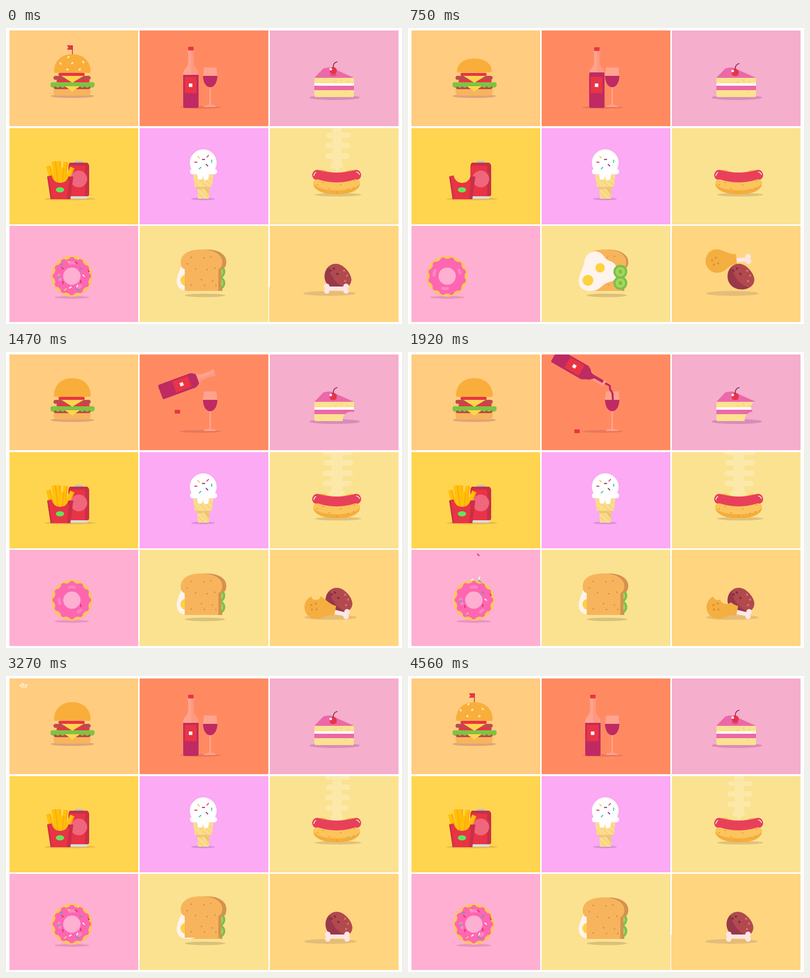
Animation, 800 px wide and 600 px high, one loop 4.59 s. Source, as an HTML page without scripts:

```html
<!DOCTYPE html>
<html lang="en">
<head>
<meta charset="utf-8">
<title>Nine snacks</title>
<style>
html, body { margin: 0; height: 100%; overflow: hidden; background: #fff; }
svg { display: block; width: 800px; height: 600px; }
/* The finished picture shows for 30 ms, then every snack is built again. */
g, use, path, rect, circle, ellipse { animation: none 4.59s linear 30ms infinite; }
.foot { transform-box: fill-box; transform-origin: 50% 100%; }
.step { animation-timing-function: step-end; }
.drop { animation-timing-function: ease-in; }
.round { stroke-linecap: round; fill: none; }

/* dN: falls into place starting at N percent */
@keyframes d0 { 0% { translate: 0 -180px } 4% { translate: 0 } }
@keyframes d2 { 0%, 2% { translate: 0 -180px } 5% { translate: 0 } }
@keyframes d4 { 0%, 4% { translate: 0 -180px } 7% { translate: 0 } }
@keyframes d6 { 0%, 6% { translate: 0 -180px } 9% { translate: 0 } }
@keyframes d8 { 0%, 8% { translate: 0 -180px } 11% { translate: 0 } }
@keyframes d11 { 0%, 11% { translate: 0 -180px } 15% { translate: 0 } }
@keyframes d13 { 0%, 13% { translate: 0 -180px } 18% { translate: 0 } }
@keyframes d16 { 0%, 16% { translate: 0 -180px } 19% { translate: 0 } }
@keyframes d18 { 0%, 18% { translate: 0 -180px } 21% { translate: 0 } }
@keyframes d20 { 0%, 20% { translate: 0 -180px } 24% { translate: 0 } }
@keyframes d22 { 0%, 22% { translate: 0 -180px } 27% { translate: 0 } }
@keyframes d27 { 0%, 27% { translate: 0 -180px } 31% { translate: 0 } }
@keyframes d31 { 0%, 31% { translate: 0 -180px } 35% { translate: 0 } }
@keyframes d35 { 0%, 35% { translate: 0 -180px } 40% { translate: 0 } }
@keyframes d38 { 0%, 38% { translate: 0 -180px } 43% { translate: 0 } }
@keyframes d42 { 0%, 42% { translate: 0 -180px } 47% { translate: 0 } }
@keyframes d73 { 0%, 73% { translate: 0 -80px } 78% { translate: 0 } }

/* bN: a bite is missing from N percent on */
@keyframes b30 { 0% { opacity: 0 } 30% { opacity: 1 } 58%, 100% { opacity: 0 } }
@keyframes b36 { 0% { opacity: 0 } 36% { opacity: 1 } 58%, 100% { opacity: 0 } }
@keyframes b44 { 0% { opacity: 0 } 44% { opacity: 1 } 58%, 100% { opacity: 0 } }
@keyframes b48 { 0% { opacity: 0 } 48% { opacity: 1 } 58%, 100% { opacity: 0 } }
@keyframes b51 { 0% { opacity: 0 } 51% { opacity: 1 } 58%, 100% { opacity: 0 } }

@keyframes hop { 0%, 51% { transform: none } 55.6% { transform: translateY(var(--j)) } 60% { transform: none } }
@keyframes bun {
  0%, 15% { transform: none } 15.7% { transform: translateY(-1px) scale(.95, .74) } 18%, 51% { transform: none }
  55.6% { transform: translateY(-19px) scale(.9, .87) } 60% { transform: none }
}
@keyframes bottle {
  0%, 25% { transform: translate(8px, 0) rotate(0) }
  36%, 48% { transform: translate(-37px, -87px) rotate(120deg) }
  55.6% { transform: translate(2px, -21px) rotate(18deg) }
  61%, 100% { transform: translate(0, 0) rotate(0) }
}
@keyframes cap {
  0%, 17% { translate: 8px 1px } 22% { translate: 0 -60px } 27% { translate: -14px -30px }
  33%, 48% { translate: -32px 119px } 53% { translate: -26px -42px } 55.6% { translate: -18px -23px } 61% { translate: 0 }
}
@keyframes fullLevel { 0% { opacity: 1 } 58%, 100% { opacity: 0 } }
@keyframes tilted { 0% { opacity: 0 } 30% { opacity: 1 } 58%, 100% { opacity: 0 } }
@keyframes pouring { 0% { opacity: 0 } 35% { opacity: 1 } 48%, 100% { opacity: 0 } }
@keyframes cake { 0% { translate: 0 -180px } 4%, 57.9% { translate: 0 } 58% { translate: 0 -180px } 63% { translate: 0 } }
@keyframes cherry {
  0%, 4% { translate: 0 -180px } 8%, 49% { translate: 0 3.5px } 53%, 59% { translate: 0 48px }
  62% { translate: 0 -22px } 66%, 94% { translate: 0 3.5px }
}
@keyframes cakeShade { 0% { opacity: 1 } 51% { opacity: 0 } 61%, 100% { opacity: 1 } }
@keyframes crumbs { 0% { opacity: 0 } 44% { opacity: 1 } 61%, 100% { opacity: 0 } }
@keyframes steam {
  0%, 17% { clip-path: inset(100% -30% 0); transform: translateY(7px) scaleX(1.25) }
  24.2% { clip-path: inset(36% -30% 0); transform: translateY(7px) scaleX(1.22) }
  32% { clip-path: inset(0 -30% 0) } 41.2% { transform: translateY(7px) scaleX(1.25) }
  55.6% { transform: translateY(11px) scaleX(1) } 70.6% { transform: translateY(8px) scaleX(1) }
  100% { clip-path: inset(0 -30% 0); transform: translateY(0) scaleX(1) }
}
@keyframes arrive { 0%, 6% { translate: -140px 0 } 15.7% { translate: -54px 0 } 21% { translate: 3px 0 } 24% { translate: 0 } }
@keyframes roll { 0%, 6% { rotate: -193deg } 15.7% { rotate: -75deg } 21% { rotate: 4deg } 24% { rotate: 0deg } }
@keyframes slice {
  0%, 22% { transform: none } 24.2% { transform: scaleY(1.06) } 27%, 68% { transform: none }
  70.6% { transform: translateY(-2.5px) } 73% { transform: none }
}
@keyframes leg {
  0%, 11% { transform: translate(-6px, -150px) rotate(-30deg) } 15.7% { transform: translate(-2px, -45px) rotate(-17deg) }
  19%, 100% { transform: translate(0, 0) rotate(0) }
}
@keyframes legShown { 0% { opacity: 1 } 50%, 100% { opacity: 0 } }
@keyframes boneShown { 0% { opacity: 0 } 50%, 100% { opacity: 1 } }
@keyframes nudge { 0% { translate: 2px 0 } 76%, 100% { translate: 0 } }
@keyframes strip { 0% { opacity: 0 } 76%, 100% { opacity: 1 } }
</style>
</head>
<body>
<svg viewBox="0 0 800 600">
<defs>
  <clipPath id="row1"><path d="M0 5h800v194H0z"/></clipPath>
  <clipPath id="row2"><path d="M0 203h800v195H0z"/></clipPath>
  <clipPath id="row3"><path d="M0 401h800v195H0z"/></clipPath>
  <ellipse id="seed" rx="2.6" ry="1.5"/>
  <path id="spr" class="round" stroke-width="2" d="M-2.3 0h4.6"/>
  <g id="fry"><path fill="#ffc107" d="M0 0h9v46H0z"/><path fill="#ffa814" d="M6.5 0h2.5v46h-2.5z"/></g>
  <path id="bread" d="M361 533V489c-6-2-8-7-8-13 0-17 14-27 42-27s42 12 42 25c0 8-3 13-8 15v44z"/>
  <g id="cucumber"><circle r="14" fill="#7cc04a"/><circle r="9.5" fill="#a5d65c"/><circle r="4" fill="#7cc04a"/></g>
  <mask id="cakeBites" maskUnits="userSpaceOnUse" x="0" y="0" width="800" height="600">
    <path fill="#fff" d="M0 0h800v600H0z"/>
    <g class="bites">
      <circle class="step" opacity="0" cx="697" cy="138" r="17" style="animation-name:b30"/>
      <circle class="step" opacity="0" cx="706" cy="112" r="13" style="animation-name:b36"/>
      <circle class="step" opacity="0" cx="692" cy="100" r="25" style="animation-name:b44"/>
      <circle class="step" opacity="0" cx="662" cy="130" r="30" style="animation-name:b48"/>
      <circle class="step" opacity="0" cx="656" cy="108" r="60" style="animation-name:b51"/>
    </g>
  </mask>
  <mask id="legBites" maskUnits="userSpaceOnUse" x="0" y="0" width="800" height="600">
    <path fill="#fff" d="M0 0h800v600H0z"/>
    <circle class="step" opacity="0" cx="624" cy="493" r="10" style="animation-name:b30"/>
    <circle class="step" opacity="0" cx="641" cy="498" r="13" style="animation-name:b36"/>
    <circle class="step" opacity="0" cx="615" cy="520" r="20" style="animation-name:b44"/>
    <circle class="step" opacity="0" cx="640" cy="525" r="26" style="animation-name:b48"/>
  </mask>
</defs>

<g clip-path="url(#row1)">
  <path fill="#ffcc80" d="M7 5h260v194H7z"/>
  <path fill="#ff8a62" d="M270 5h260v194H270z"/>
  <path fill="#f5aecb" d="M533 5h260v194H533z"/>

  <g id="burger">
    <ellipse cx="134" cy="138" rx="44" ry="3.8" fill="#dba57a"/>
    <path class="drop" style="animation-name:d0" fill="#f8b45c" d="M96 124h75v4q0 9-9 9h-57q-9 0-9-9z"/>
    <rect class="drop" style="animation-name:d2" x="96" y="115" width="75" height="9" rx="4.5" fill="#b94a48"/>
    <g class="drop" style="animation-name:d4,hop;--j:-3px">
      <path class="round" stroke="#7fc342" stroke-width="10" stroke-dasharray="0 9.85" d="M95 116h79.5"/>
      <rect x="90" y="110" width="89" height="8" rx="4" fill="#7fc342"/>
    </g>
    <path class="drop" style="animation-name:d4" fill="#ffd54f" d="M119 118h30l-15 11z"/>
    <rect class="drop" style="animation-name:d6,hop;--j:-4px" x="102" y="105" width="67" height="5" rx="2.5" fill="#e83445"/>
    <rect class="drop" style="animation-name:d6,hop;--j:-5px" x="96" y="97" width="75" height="8" rx="4" fill="#bd4c4b"/>
    <path class="drop" style="animation-name:d8,hop;--j:-5px" fill="#ffd54f" d="M112 97h45l-23 14z"/>
    <rect class="drop" style="animation-name:d8,hop;--j:-12px" x="106" y="91" width="53" height="6" rx="3" fill="#e83445"/>
    <path class="foot drop" style="animation-name:d11,bun" fill="#f9ae3b" d="M97 88c0-21 15-35 37-35s37 14 37 35q0 3-3 3h-68q-3 0-3-3z"/>
    <g fill="#fff3d9">
      <use href="#seed" transform="translate(124 84)" style="animation-name:d20,hop;--j:-45px"/>
      <use href="#seed" transform="translate(149 84) rotate(-30)" style="animation-name:d22,hop;--j:-44px"/>
      <use href="#seed" transform="translate(110 72) rotate(60)" style="animation-name:d27,hop;--j:-33px"/>
      <use href="#seed" transform="translate(134 71) rotate(-40)" style="animation-name:d31,hop;--j:-37px"/>
      <use href="#seed" transform="translate(156 69) rotate(50)" style="animation-name:d27,hop;--j:-39px"/>
      <use href="#seed" transform="translate(126 59) rotate(-50)" style="animation-name:d31,hop;--j:-39px"/>
    </g>
    <g class="drop" style="animation-name:d73"><path fill="#a8324a" d="M133.5 35h1.5v18h-1.5z"/><path fill="#e83445" d="M123 35h11v9h-11l3-4.500z"/></g>
  </g>

  <g id="wine">
    <ellipse cx="393" cy="161" rx="42" ry="2.8" fill="#e9785a"/>
    <path fill="#ffa38f" d="M400 80h25l2 17c0 13-6 22-13 22.500V156q10 .5 11 4h-26q1-3.500 12-4v-36.500c-8-1-13-10-13-22.500z"/>
    <path fill="#bf2a63" d="M398 97h29c0 13-6 23-14.500 23s-14.500-10-14.500-23z"/>
    <path class="step" opacity="0" style="animation-name:pouring" fill="none" stroke="#bf2a63" stroke-width="4" d="M398 63c6 4 11 4 10 9s4 7 5 12 0 7 1 13"/>
    <g style="animation-name:bottle;transform-origin:373px 116px">
      <path fill="#ffa38f" d="M367 45h13v7h-1v19c1 10 10 12 10 22v66q0 3-3 3h-25q-3 0-3-3V93c0-10 9-12 10-22V52h-1z"/>
      <path fill="#ff9880" d="M374 45h6v7h-1v19c1 10 10 12 10 22v3h-15z"/>
      <g fill="#bf2a63">
        <path d="M358 95h31v64q0 3-3 3h-25q-3 0-3-3z"/>
        <path class="step" opacity="0" style="animation-name:fullLevel" d="M358.500 90h30l.5 6h-31z"/>
        <path class="step" opacity="0" style="animation-name:tilted" d="M364 82h19c3 3 6 6 6 14h-31c0-8 3-11 6-14z"/>
        <path class="step" opacity="0" style="animation-name:pouring" d="M368 50h6v19c6 4 10 11 10 14h-20c3-4 4-6 4-12z"/>
      </g>
      <path fill="#e83445" d="M361 99h24v33h-24z"/>
      <path fill="#fff" d="M369.500 112.500h7v7h-7z"/>
    </g>
    <rect x="368" y="38" width="11" height="7.500" rx="1" fill="#e83445" style="animation-name:cap"/>
  </g>

  <g id="dessert">
    <ellipse class="step" style="animation-name:cakeShade" cx="664" cy="141" rx="51" ry="5" fill="#d88cba"/>
    <g class="step" opacity="0" style="animation-name:crumbs" fill="#e0407a">
      <circle cx="633" cy="138" r="1.200"/><circle cx="641" cy="137" r="1" fill="#fbe28f"/><circle cx="645" cy="139" r="1"/>
      <circle cx="674" cy="140" r="1"/><circle cx="698" cy="136" r="1.300"/><circle cx="705" cy="138" r="1" fill="#fbe28f"/><circle cx="710" cy="140" r="1"/>
    </g>
    <g style="animation-name:cake" mask="url(#cakeBites)">
      <path fill="#ec68a8" d="M623 101l18-19q7-2 15-2l47 21z"/>
      <path fill="#fbe28f" d="M623 101h80v36q0 3-3 3h-74q-3 0-3-3z"/>
      <path fill="#fff" d="M623 112h80v5h-80z"/>
      <path fill="#ec68a8" d="M623 117h80v9h-80z"/>
      <path stroke="#efba5f" stroke-width="2" stroke-linecap="round" d="M666 109h0M678 106h0M690 109h0M686 130h0"/>
      <ellipse cx="661" cy="95" rx="7" ry="2.500" fill="#d94e91"/>
    </g>
    <g style="animation-name:cherry">
      <circle cx="661" cy="86.500" r="7.300" fill="#e83445"/><circle cx="656" cy="83.500" r="2.600" fill="#fff"/>
      <path class="round" stroke="#7a1f4a" stroke-width="1.600" d="M661 80q0-10 8-11.500"/>
    </g>
  </g>
</g>

<g clip-path="url(#row2)">
  <path fill="#ffd54f" d="M7 203h260v195H7z"/>
  <path fill="#fbaaf3" d="M270 203h260v195H270z"/>
  <path fill="#fbe290" d="M533 203h260v195H533z"/>

  <g id="meal">
    <ellipse cx="129" cy="346.500" rx="52" ry="2.800" fill="#e6b94a"/>
    <ellipse cx="147" cy="271.500" rx="10" ry="2" fill="#aebfd0"/>
    <path fill="#d8dbe0" d="M128 338h37v5q0 3-4 3h-29q-4 0-4-3z"/>
    <path fill="#c92f47" d="M129 273h35q4 3 4 7v57q0 4-4 4h-34q-4 0-4-4v-57q0-4 3-7z"/>
    <path fill="#e83445" d="M130 279h27q3 0 3 4v54q0 4-4 4h-26q-4 0-4-4v-54q0-4 4-4z"/>
    <circle cx="147" cy="306" r="17" fill="#f0667c"/>
    <g class="fries">
      <use href="#fry" class="drop" style="animation-name:d16" transform="translate(102 270)"/>
      <use href="#fry" class="drop" style="animation-name:d18" transform="translate(116 271) rotate(6)"/>
      <use href="#fry" class="drop" style="animation-name:d16" transform="translate(130 281) rotate(24)"/>
      <use href="#fry" class="drop" style="animation-name:d22" transform="translate(92 271) rotate(-7)"/>
      <use href="#fry" class="drop" style="animation-name:d18" transform="translate(81 281) rotate(-14)"/>
      <use href="#fry" class="drop" style="animation-name:d20" transform="translate(109 283) rotate(5)"/>
    </g>
    <path fill="#c92f47" d="M83 301l9-2q4 15 17 15 14 0 17-13h10l-6 46H90z"/>
    <path fill="#e83445" d="M86 300l6-1q4 15 17 15 12 0 16-10l2 9-4 34H93z"/>
    <ellipse cx="109" cy="328" rx="8.500" ry="5.300" fill="#64e35c"/>
  </g>

  <g id="cone">
    <ellipse cx="398" cy="346.500" rx="24" ry="2.500" fill="#d78fd6"/>
    <path fill="#fbdc8c" d="M378 297h41l-3 25h-5l-1 24h-22l-2-24h-5z"/>
    <path stroke="#f1c970" stroke-width="1.200" d="M380 312l8 10M384 300l22 22M396 300l20 20M408 300l9 9M388 334l12 12M390 324l20 20M402 324l8 8"/>
    <path fill="#e9bc68" d="M386 322h25v3l-25 2zM411 322l-1 18-10-15z" opacity=".7"/>
    <g class="drop" style="animation-name:d0">
      <circle cx="398.500" cy="273" r="27" fill="#fff"/>
      <path class="round" stroke="#fff" stroke-width="11" d="M377 291h44M392 293v9M404 293v10"/>
    </g>
    <use href="#spr" style="animation-name:d2" stroke="#fbc04a" transform="translate(389 262) rotate(45)"/>
    <use href="#spr" style="animation-name:d4" stroke="#e83460" transform="translate(383.500 272)"/>
    <use href="#spr" style="animation-name:d4" stroke="#7a2a70" transform="translate(399 266.500)"/>
    <use href="#spr" style="animation-name:d6" stroke="#2cc0b0" transform="translate(415.500 270) rotate(90)"/>
    <use href="#spr" style="animation-name:d6" stroke="#7a2a70" transform="translate(406 278) rotate(45)"/>
    <use href="#spr" style="animation-name:d8" stroke="#2cc0b0" transform="translate(392 284) rotate(-45)"/>
    <use href="#spr" style="animation-name:d13" stroke="#e83460" transform="translate(407.500 260) rotate(-45)"/>
  </g>

  <g id="hotdog">
    <g class="foot" style="animation-name:steam" fill="#fff" opacity=".24">
      <path d="M660 190h18v88l-9 14-9-14z"/>
      <rect x="645" y="191" width="50" height="11" rx="5.500"/><rect x="647" y="212" width="49" height="11" rx="5.500"/>
      <rect x="645" y="233" width="50" height="11" rx="5.500"/><rect x="645" y="254" width="48" height="11" rx="5.500"/><rect x="655" y="274" width="26" height="10" rx="5"/>
    </g>
    <ellipse cx="671" cy="338" rx="47" ry="3.400" fill="#e0c27c"/>
    <path fill="#f9b84a" d="M624 300c4-16 16-14 27-9q17 6 34 0c11-5 21-6 26 9z"/>
    <path class="round" stroke="#e8405a" stroke-width="21" d="M629 298Q668 309 707 298"/>
    <path class="round" stroke="#fff" stroke-width="1.500" d="M622 299q1-5 4-6M708 292q5 1 6 5"/>
    <path fill="#f5ad3c" d="M621 314q1-8 9-7 38 12 76 0 8-1 9 7c1 15-20 23-47 23s-48-8-47-23z"/>
    <path fill="#fcc45c" d="M621 314q1-8 9-7 38 12 76 0 8-1 9 7c-3 10-24 15-47 15s-44-5-47-15z"/>
    <path class="round" stroke="#df9438" stroke-width="2.600" d="M629 318h0M641 313h0M653 326h0M668 333h0M676 318h0M691 327h0M704 310h0M702 324h0"/>
  </g>
</g>

<g clip-path="url(#row3)">
  <path fill="#ffafd2" d="M7 401h260v195H7z"/>
  <path fill="#fbe290" d="M270 401h260v195H270z"/>
  <path fill="#ffd580" d="M533 401h260v195H533z"/>

  <g id="donut" style="animation-name:arrive">
    <ellipse cx="133" cy="546" rx="35" ry="3" fill="#ea94c0"/>
    <g style="animation-name:roll;transform-origin:133px 503px">
      <circle cx="133" cy="503" r="41.500" fill="#fcc75c"/>
      <circle cx="133" cy="503" r="35.500" fill="#fe66b1"/>
      <circle cx="133" cy="503" r="33" class="round" stroke="#fe66b1" stroke-width="12" stroke-dasharray="0 17.280"/>
      <path class="round" stroke="#ff86c2" stroke-width="6" d="M128 477q5-2 10 0M107 501q0 6 2 9M151 523l-5 4"/>
      <circle cx="133" cy="503" r="17.500" fill="#ffafd2"/>
    </g>
    <use href="#spr" style="animation-name:d31" stroke="#ffd54f" transform="translate(120 530) rotate(-40)"/>
    <use href="#spr" style="animation-name:d31" stroke="#2cb5b8" transform="translate(107 505) rotate(-50)"/>
    <use href="#spr" style="animation-name:d31" stroke="#e02a62" transform="translate(115 516) rotate(85)"/>
    <use href="#spr" style="animation-name:d27" stroke="#e02a62" transform="translate(151 514) rotate(85)"/>
    <use href="#spr" style="animation-name:d31" stroke="#fff" transform="translate(157 502) rotate(40)"/>
    <use href="#spr" style="animation-name:d35" stroke="#e02a62" transform="translate(167 492) rotate(60)"/>
    <use href="#spr" style="animation-name:d35" stroke="#2cb5b8" transform="translate(151 487)"/>
    <use href="#spr" style="animation-name:d38" stroke="#fff" transform="translate(144 523) rotate(-60)"/>
    <use href="#spr" style="animation-name:d38" stroke="#e02a62" transform="translate(142 476) rotate(40)"/>
    <use href="#spr" style="animation-name:d38" stroke="#2cb5b8" transform="translate(145 530) rotate(30)"/>
    <use href="#spr" style="animation-name:d38" stroke="#fff" transform="translate(130 526) rotate(-35)"/>
    <use href="#spr" style="animation-name:d42" stroke="#2cb5b8" transform="translate(112 480) rotate(-15)"/>
    <use href="#spr" style="animation-name:d42" stroke="#e02a62" transform="translate(114 487) rotate(40)"/>
    <use href="#spr" style="animation-name:d42" stroke="#ffd54f" transform="translate(127 474) rotate(30)"/>
  </g>

  <g id="sandwich">
    <ellipse cx="402" cy="542" rx="41" ry="3.500" fill="#d9c07c"/>
    <g class="drop" style="animation-name:d0">
      <use href="#bread" x="8" fill="#d4924f"/><use href="#bread" x="4" fill="#f8b45c"/>
      <path class="round" stroke="#c98a45" stroke-width="2.600" d="M403 465h0M417 463h0M405 521h0"/>
    </g>
    <g class="drop" style="animation-name:d4">
      <path fill="#fff3ee" d="M357 470c4-14 18-21 30-15 10 5 10 14 20 17 13 4 17 14 15 28-2 15-14 13-23 18-10 6-14 16-32 15-15-1-23-9-22-22 2-16 9-22 12-41z"/>
      <circle cx="388" cy="486" r="9.500" fill="#fdd23e"/><circle cx="363.500" cy="511.500" r="11" fill="#fdd23e"/>
    </g>
    <use href="#cucumber" class="drop" style="animation-name:d6" transform="translate(429 517)"/>
    <use href="#cucumber" class="drop" style="animation-name:d8" transform="translate(429 494)"/>
    <g class="foot drop" style="animation-name:d18,slice">
      <path fill="#d4924f" d="M395 449h10c28 0 40 12 40 25 0 8-5 13-10 15v41q0 3-3 3h-20z"/>
      <use href="#bread" fill="#f8b45c"/>
      <path class="round" stroke="#c98a45" stroke-width="2.800" d="M374 465h0M400 466h0M414 464h0M366 478h0M383 488h0M406 490h0M422 487h0M374 521h0M395 510h0M401 522h0M417 513h0M424 522h0"/>
    </g>
  </g>

  <g id="chicken" class="step" style="animation-name:nudge">
    <ellipse cx="653.500" cy="538" rx="53" ry="5" fill="#e4bd77"/>
    <g class="drop" style="animation-name:d4">
      <path fill="#98384a" d="M643.500 503c0-14 10-25 23-25 15 0 31 20 31 32 0 13-13 20-25 20-17 0-29-11-29-27z"/>
      <path fill="#b04a4e" d="M652 484q6-6 14.500-6c15 0 31 20 31 32 0 7-4 13-10 16-16-3-32-19-35.500-42z"/>
      <path class="round" stroke="#822f40" stroke-width="4" d="M662 487l1 1M655 491l1 1M669 498l1 1"/>
      <path class="round" stroke="#d97068" stroke-width="4.500" d="M683 492h0M689 502h0M685 513h0"/>
    </g>
    <g class="step" opacity="0" style="animation-name:legShown">
      <g style="animation-name:leg;transform-origin:625px 517px">
        <path class="round" stroke="#ffe6e6" stroke-width="8" d="M655 525l29 7"/>
        <circle cx="687" cy="526.500" r="5.500" fill="#ffe6e6"/><circle cx="685" cy="536" r="5.500" fill="#ffe6e6"/>
        <g mask="url(#legBites)">
          <path fill="#f5ae40" d="M625 493c15 0 20 16 40 22l-4 19c-18-3-22 7-36 7-14 0-24-11-24-24s11-24 24-24z"/>
          <path class="round" stroke="#d98a34" stroke-width="4" d="M615 513h0M624 510h0M625 522h0M616 522h0"/>
        </g>
      </g>
    </g>
    <g class="step" style="animation-name:boneShown" fill="#ffe6e6">
      <path d="M648 524h39v8h-39z"/>
      <circle cx="648" cy="523.500" r="5.500"/><circle cx="648" cy="533" r="5.500"/><circle cx="687" cy="523.500" r="5.500"/><circle cx="687" cy="533" r="5.500"/>
    </g>
  </g>
</g>

<path fill="#fff" d="M0 0h7v600H0zM267 0h3v600h-3zM530 0h3v600h-3zM793 0h7v600h-7z"/>
<path class="step" style="animation-name:strip" fill="#ffd580" d="M531.500 525h2v71h-2z"/>
</svg>
</body>
</html>
```
